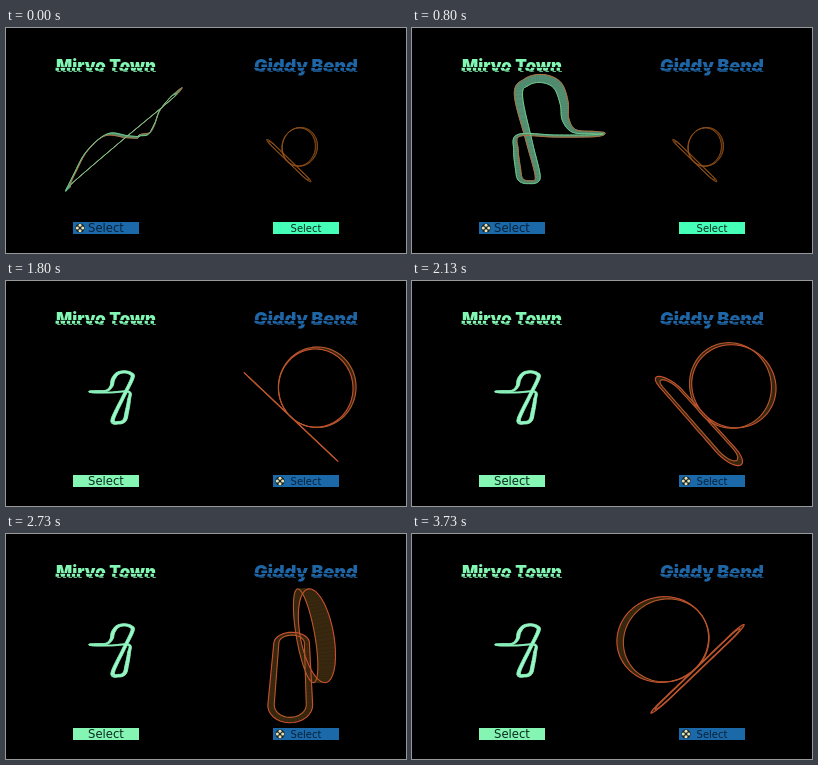
These frames come from a looping animation (400 by 225 pixels, 3800 ms). An HTML page with a canvas:

```html
<!DOCTYPE html>
<html lang="en">
<head>
<meta charset="utf-8">
<style>
  html, body { margin: 0; width: 100%; height: 100%; overflow: hidden; background: #000; }
  canvas { display: block; width: 400px; height: 225px; }
</style>
</head>
<body>
<canvas id="stage" width="400" height="225"></canvas>
<script>
const ctx = document.getElementById('stage').getContext('2d');
const TAU = Math.PI * 2, CAMERA = 280, LOOP_MS = 3800, SWITCH_MS = 1660;

const cross = (a, b) => [a[1] * b[2] - a[2] * b[1], a[2] * b[0] - a[0] * b[2], a[0] * b[1] - a[1] * b[0]];

// Turns centre points {p, n: surface normal, w: half width} into two edge lines.
function ribbon(points) {
  const count = points.length;
  return points.map(({ p, n, w }, i) => {
    const next = points[(i + 1) % count].p, last = points[(i + count - 1) % count].p;
    const side = cross(n, next.map((v, k) => v - last[k]));
    const f = w / (Math.hypot(...side) || 1);
    return [p.map((v, k) => v + side[k] * f), p.map((v, k) => v - side[k] * f)];
  });
}

// City circuit: closed spline through [x, y, z, half width].
function cityTrack() {
  const knots = [
    [-20, 41, -54, 3], [-.5, -1, -5, 3], [18, -40, 42, 3.4], [13, -50, 52, 3.6],
    [0, -53, 54, 3.8], [-14, -49, 49, 3.8], [-23, -36, 39, 3.6], [-26, -22, 34, 3],
    [-36, -12, 29, 2], [-58, -11, 22, 1.6], [-70, -10, 19, 1.6], [-58, -8, 18, 1.5],
    [-25, -8, 3, 1.6], [9, -9, -17, 1.8], [9, 7, -36, 2.6], [5, 28, -48, 3],
    [1, 42, -55, 3], [-9, 46, -57, 3]];
  const at = i => knots[(i + knots.length) % knots.length], points = [];
  knots.forEach((b, i) => {
    const a = at(i - 1), c = at(i + 1), d = at(i + 2);
    for (let t = 0; t < 1; t += .125) {
      const q = b.map((v, k) => v + t * ((c[k] - a[k]) / 2 + t * (a[k] - 2.5 * v + 2 * c[k] - d[k] / 2
        + t * (1.5 * (v - c[k]) + (d[k] - a[k]) / 2))));
      points.push({ p: q.slice(0, 3), n: [0, .72, .69], w: q[3] });
    }
  });
  return ribbon(points);
}

// Tilted oval with a vertical loop standing on one of its straights.
function loopTrack() {
  const HALF = 44, BEND = 17, R = 41, ux = .73, uy = .69, up = [uy, -ux, 0], points = [];
  const add = (u, h, z, n = up, w = 2.8) =>
    points.push({ p: [u * ux + h * uy, u * uy - h * ux, z], n, w });
  for (let u = -HALF; u < 0; u += 4) add(u, 0, BEND);
  for (let i = 0; i <= 80; i++) {
    const a = i / 80 * TAU, s = Math.sin(a), c = Math.cos(a);
    add(R * s, R * (1 - c), BEND + 12 * s, [uy * c - ux * s, -ux * c - uy * s, 0], 4.5 + 2.5 * Math.sin(a - .6));
  }
  for (let u = 4; u < HALF; u += 4) add(u, 0, BEND);
  for (let a = 0; a < Math.PI; a += .2) add(HALF + BEND * Math.sin(a), 0, BEND * Math.cos(a));
  for (let u = HALF; u > -HALF; u -= 4) add(u, 0, -BEND);
  for (let a = 0; a < Math.PI; a += .2) add(-HALF - BEND * Math.sin(a), 0, -BEND * Math.cos(a));
  return ribbon(points);
}

function drawTrack(track, { x, y, scale, angle, fill, edges, line }) {
  const c = Math.cos(angle * TAU / 360), s = Math.sin(angle * TAU / 360);
  const project = p => {
    const k = scale * CAMERA / (CAMERA + scale * (p[2] * c - p[0] * s));
    return [x + k * (p[0] * c + p[2] * s), y + k * p[1]];
  };
  const pairs = track.map(pair => pair.map(project));
  ctx.fillStyle = ctx.strokeStyle = fill;
  ctx.lineJoin = 'round';
  ctx.lineWidth = .6;
  pairs.forEach(([a, b], i) => {
    const [d, e] = pairs[(i + 1) % pairs.length];
    ctx.beginPath();
    [a, d, e, b].forEach(q => ctx.lineTo(...q));
    ctx.closePath();
    ctx.fill();
    ctx.stroke();
  });
  ctx.lineWidth = line;
  edges.forEach((colour, k) => {
    ctx.strokeStyle = colour;
    ctx.beginPath();
    pairs.forEach(pair => ctx.lineTo(...pair[k]));
    ctx.closePath();
    ctx.stroke();
  });
}

// Heavy title sliced into two slightly shifted bands.
function drawTitle(text, x, size, colour) {
  ctx.font = `900 ${size}px Inter, sans-serif`;
  ctx.fillStyle = colour;
  [[28, 11, 0], [39.7, 3, -1.2], [43.2, 8, .6]].forEach(([top, height, shift]) => {
    ctx.save();
    ctx.beginPath();
    ctx.rect(0, top, 400, height);
    ctx.clip();
    ctx.fillText(text, x + shift, 44);
    ctx.restore();
  });
}

function drawButton(x, size, colour, selected) {
  ctx.fillStyle = selected ? '#1c69a9' : colour;
  ctx.fillRect(x - 33, 194, 66, 12);
  ctx.fillStyle = selected ? '#082238' : '#0b2a20';
  ctx.font = `${size}px "DejaVu Sans", sans-serif`;
  ctx.fillText('Select', x, 200 + size * .36);
  if (!selected) return;
  const dot = (dx, dy, r, fill) => {
    ctx.fillStyle = fill;
    ctx.beginPath();
    ctx.arc(x - 26 + dx, 200 + dy, r, 0, TAU);
    ctx.fill();
  };
  dot(0, 0, 4.6, '#1b2628');
  [[0, -2.7], [2.7, 0], [0, 2.7], [-2.7, 0]].forEach(([dx, dy]) => dot(dx, dy, 1.5, '#e8e2b4'));
}

const city = cityTrack(), loop = loopTrack();

function draw(ms) {
  const t = Math.floor(ms % LOOP_MS * .015 + .06) / .015;
  const onCity = t < SWITCH_MS;
  ctx.fillStyle = '#000';
  ctx.fillRect(0, 0, 400, 225);
  ctx.textAlign = 'center';

  drawTrack(city, onCity
    ? { x: 118, y: 116, scale: 1, angle: 89 + t * .1, fill: '#538f73', edges: ['#b5703f', '#6fc98a'], line: 1 }
    : { x: 118, y: 115.5, scale: .51, angle: 0, fill: '#9dffcb', edges: ['#7de9ae', '#7de9ae'], line: .5 });
  drawTrack(loop, onCity
    ? { x: 283, y: 133, scale: .48, angle: -14, fill: '#40220a', edges: ['#98561c', '#98561c'], line: .8 }
    : { x: 285, y: 136, scale: 1, angle: -14 + (t - SWITCH_MS) * .098, fill: '#38280f', edges: ['#c9502f', '#b8562b'], line: 1.1 });

  drawTitle('Mirvo Town', 100, 17, '#82f7b3');
  drawTitle('Giddy Bend', 300, 18, '#1f66a6');
  drawButton(100, 11.6, '#84f5b2', onCity);
  drawButton(300, 10, '#45ffb8', !onCity);
}

function tick() {
  draw(performance.now());
  requestAnimationFrame(tick);
}
tick();
</script>
</body>
</html>
```
